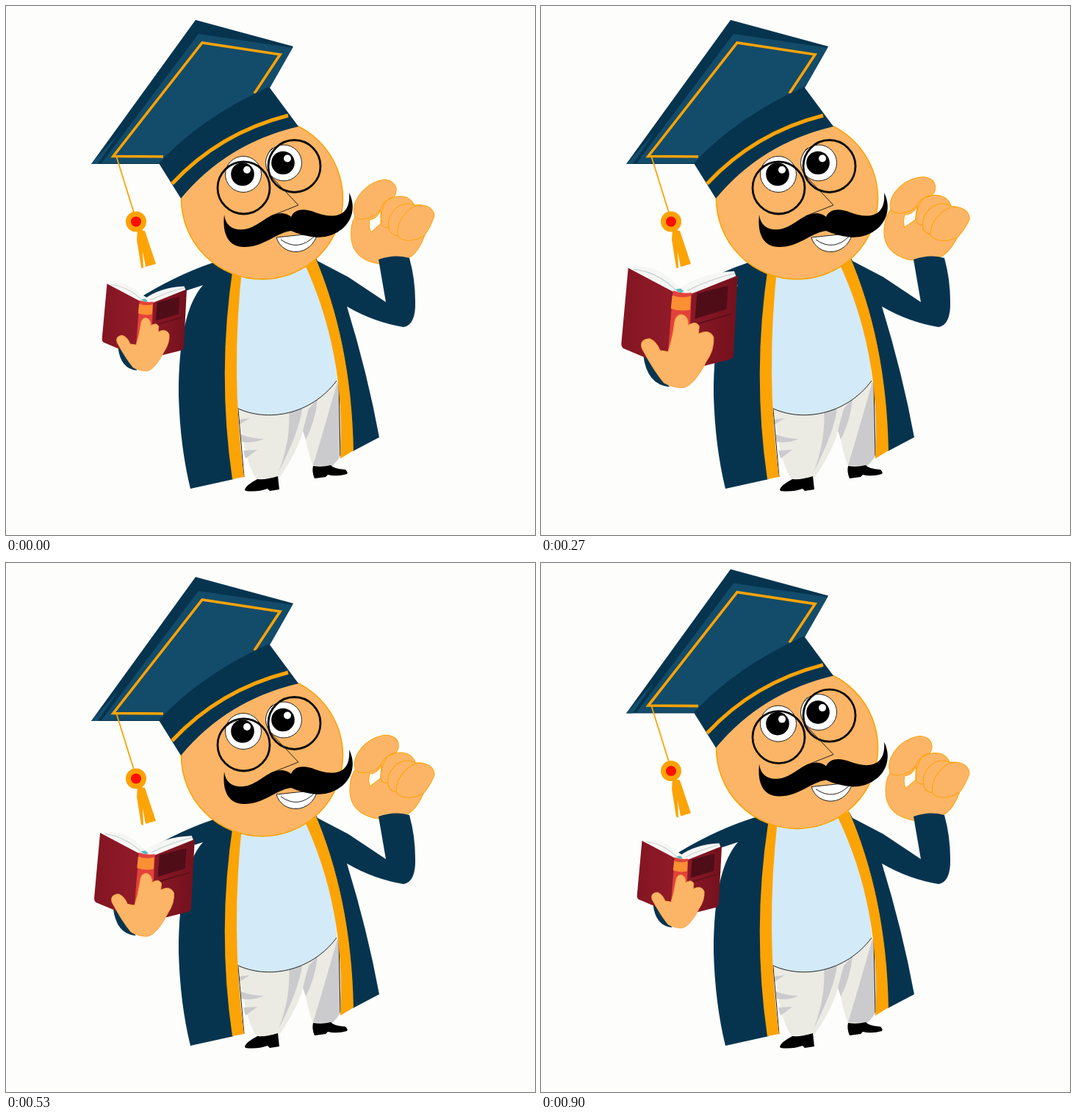
These frames come from a looping animation (720 by 720 pixels, 0.93 s). An HTML page with a canvas:

```html
<!DOCTYPE html>
<html lang="en">
<head>
<meta charset="utf-8">
<title>Professor</title>
<style>
html, body { margin: 0; width: 100%; height: 100%; overflow: hidden; background: #fdfdfc; }
canvas { display: block; width: 100vmin; height: 100vmin; }
</style>
</head>
<body>
<canvas id="stage" width="720" height="720"></canvas>
<script>
const ctx = document.getElementById('stage').getContext('2d');
const LOOP = 930;
const PAPER = '#fdfdfc', NAVY = '#06344f', BLUE = '#134c6a', ORANGE = '#fca306',
  SKIN = '#fcb566', SHIRT = '#d3eaf8', PANTS = '#ebebe4', SHADE = '#cbcbce';

function shape(d, fill, stroke, width = 1) {
  const path = new Path2D(d);
  if (fill) { ctx.fillStyle = fill; ctx.fill(path); }
  if (stroke) { ctx.strokeStyle = stroke; ctx.lineWidth = width; ctx.stroke(path); }
}

function circle(x, y, r, fill, stroke, width = 1) {
  ctx.beginPath();
  ctx.arc(x, y, r, 0, Math.PI * 2);
  if (fill) { ctx.fillStyle = fill; ctx.fill(); }
  if (stroke) { ctx.strokeStyle = stroke; ctx.lineWidth = width; ctx.stroke(); }
}

function group(transform, draw) {
  ctx.save();
  transform();
  draw();
  ctx.restore();
}

function about(x, y, scale, angle = 0) {
  ctx.translate(x, y);
  ctx.rotate(angle);
  ctx.scale(scale, scale);
  ctx.translate(-x, -y);
}

function legs() {
  shape('M316 540Q323 618 341 644L372 642Q398 605 405 575Q410 605 418 627L444 626Q456 618 456 600L450 500Z', PANTS);
  shape('M385 550L403 548Q399 580 371 634Q388 590 385 550Z', SHADE);
  shape('M412 548L424 535Q421 565 408 590L404 578Z', SHADE);
  shape('M453 512L456 612L444 626L418 625Q431 582 451 512Z', SHADE);
  shape('M316 563L332 561L317 570Z', SHADE);
  shape('M319 583Q335 589 351 589Q336 596 321 593Z', SHADE);
  shape('M323 605L342 604L326 616Z', SHADE);
  shape('M325 658Q327 652 342 644Q355 645 370 640L372 658L359 660L356 657Q342 662 326 660Z', '#000');
  shape('M418 626Q430 628 442 625Q446 630 462 631Q466 635 464 637Q450 641 438 638L435 641L420 643Q416 634 418 626Z', '#000');
}

function robe() {
  shape('M314 547C355 567 415 557 450 510Q448 440 408 340L320 340Q308 440 314 547Z', SHIRT);
  shape('M314 547C355 567 415 557 450 510M316 549L324 641M453 514L455 612', null, '#222');
  shape('M318 338L292 346Q240 362 187 394L200 402L268 380C247 404 235 450 235 530Q237 600 251 657L310 644Q288 500 318 338Z', NAVY);
  shape('M309 355Q287 500 308 644L324 641Q305 500 322 350Z', ORANGE);
  shape('M418 336L424 347L466 369L517 403L507 345Q530 337 549 343Q557 372 557 402Q558 434 541 437Q500 430 464 409Q492 500 508 587L472 606Q470 455 418 336Z', NAVY);
  shape('M404 346L419 338Q470 455 473 605L455 616Q463 470 404 346Z', ORANGE);
}

function raisedHand() {
  shape('M508 351Q474 346 470 318Q468 297 475 287Q470 274 479 260C488 245 505 236 517 236.5C532 238 534 252 528 260Q548 255 556 271Q582 269 583 286Q578 301 570 312Q561 337 548 343L530 350Z', SKIN, ORANGE);
  shape('M495 291Q505 290 510 278L510 296Q502 303 497 308Q493 301 495 291Z', PAPER, ORANGE);
  shape('M475 287Q483 293 495 288Q508 284 512 271Q515 265 528 260M511 297Q509 279 517 266Q522 260 528 260M511 297Q514 303 521 301Q518 287 532 274Q543 266 556 271M521 301Q521 311 533 313Q531 297 542 284Q553 270 566 271M533 313Q541 323 560 317L570 312', null, ORANGE);
}

function mortarboard() {
  shape('M258 19L391 55L358 113L210 215L116 215Z', NAVY);
  shape('M262 38L390 57L358 113L210 214L130 214Z', BLUE);
  shape('M116 215L153 174L125 215Z', BLUE);
  shape('M338 119L373 66L267 50L146 204.5L214 205', null, ORANGE, 3.6);
  shape('M358 110L398 164Q300 187 238 262L208 214Q265 152 358 110Z', NAVY);
  shape('M226 242Q290 173 384 149', null, ORANGE, 5);
  shape('M150 204L174 281', null, ORANGE, 1.8);
  shape('M179 304L189 306L204 351L190 355L186 334L187 357L184 356L178 318Z', ORANGE);
  circle(177, 293.5, 14, ORANGE);
  circle(177, 293.5, 7, '#fb1006');
}

function eye(x, y) {
  circle(x, y, 24.5, '#fff', '#222');
  circle(x - 1, y, 15.8, '#000');
  circle(x + 5, y - 6, 5, '#fff');
}

function head() {
  circle(348.5, 262, 110, SKIN, ORANGE, 1.6);
  mortarboard();
  shape('M360 228Q349 205 363 193', '#fff', '#222');
  eye(323, 229);
  eye(378, 213.5);
  circle(323.5, 247.5, 35.5, null, '#080808', 2.8);
  circle(392.5, 218, 35.5, null, '#080808', 2.8);
  shape('M359 230L398 271L360 286', null, '#222');
  shape('M368 315C376 342 416 342 424 309Z', '#fff', '#222');
  shape('M374 318Q398 335 420 313', null, '#222');
  shape('M297 284C299 301 312 307 329 303C348 297 357 282 376 282Q384 283 388 287C393 276 406 275 421 281C442 289 470 290 467 254C476 272 472 291 458 303Q444 315 424 315Q403 313 388 306C366 309 352 328 324 328C303 328 294 311 297 284Z', '#000');
}

function book() {
  shape('M136 478Q141 521 174 524L150 486Z', NAVY);
  const cover = ctx.createLinearGradient(105, 0, 272, 0);
  cover.addColorStop(0, '#841522');
  cover.addColorStop(0.4, '#901a28');
  cover.addColorStop(0.6, '#8b1826');
  cover.addColorStop(1, '#73111d');
  shape('M118 351Q158 343 189 381Q220 358 268 356L271 364L204 390L181 387Z', '#f6f7f4');
  shape('M122 353Q157 357 185 385M200 384Q230 369 268 359', null, '#cbd3d2', 1.5);
  shape('M114 351L180 386L173 488L145 484L107 468Q104 466 104 461Z', cover);
  shape('M205 389L273 362L267 478Q266 483 262 484L202 499L190 480Z', cover);
  shape('M179 384Q192 389 206 387L202 480L172 472Z', '#e3423a');
  shape('M178 391Q191 396 205 392L204 412Q190 415 176 410Z', '#fa8f33');
  shape('M183 382Q189 390 195 385L190 381Z', '#58b7c0');
  shape('M214 388L259 377L257 411L211 425Z', '#4f0d18');
  shape('M209 434L264 418', null, '#5a0f1a', 2);
  shape('M134 468Q130 455 145 454Q155 458 160 471L172 473Q178 455 181 434Q182 419 192 419Q202 422 201 435Q212 427 217 436L216 447Q232 439 238 452Q239 470 228 486Q211 520 195 525Q180 526 166 518Q151 500 134 468Z', SKIN, '#f6a548', 1.2);
}

// Four steps up, four down; the last rise is cut to three steps.
function headLift(step) {
  const k = step % 8;
  return step > 24 ? (step - 24) / 3 : 1 - Math.abs(k - 4) / 4;
}

function render(time) {
  const step = Math.floor((Math.floor((time % LOOP) / 10) + 0.5) * 0.3);
  const grow = Math.max(0, 1 - Math.abs(step - 10) / 10);
  const turn = step > 10 ? Math.max(0.13, 1 - (step - 10) * 0.09) : grow;

  ctx.fillStyle = PAPER;
  ctx.fillRect(0, 0, 720, 720);
  legs();
  group(() => about(546, 289, 1, 0.17 * turn), raisedHand);
  robe();
  group(() => ctx.translate(0, -10.4 * headLift(step)), head);
  group(() => about(188, 436, (1 + 0.465 * grow) / 1.465), book);
}

const start = performance.now();
function tick() {
  render(performance.now() - start);
  requestAnimationFrame(tick);
}
tick();
</script>
</body>
</html>
```
